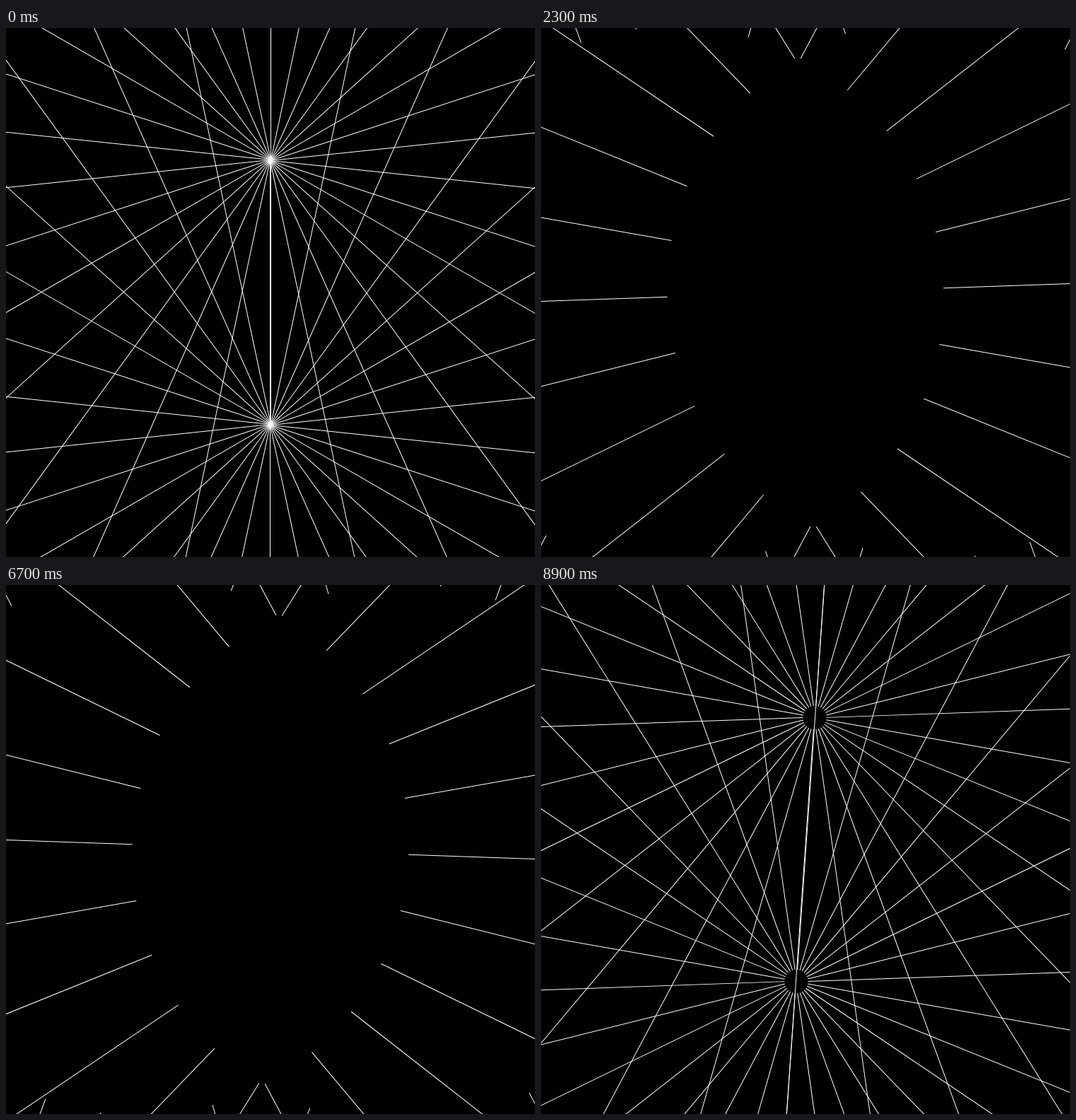
Animation of 748 by 748 pixels, one loop 9000 ms. Source, as an HTML page with a canvas:

```html
<!DOCTYPE html>
<html lang="en">
<head>
<meta charset="utf-8">
<title>Twin starbursts</title>
<style>
  html, body { margin: 0; width: 100%; height: 100%; overflow: hidden; background: #000; }
  canvas { display: block; }
</style>
</head>
<body>
<canvas id="stage" width="748" height="748"></canvas>
<script>
const SIZE = 748;
const LOOP = 9000;
const STEP = 100;
const RAYS = 30;
const ORBIT = SIZE / 4;
const REACH = SIZE * 2;
const TAU = Math.PI * 2;

const ctx = document.getElementById('stage').getContext('2d');

// Rays lie on the clockwise side of their radius, one pixel wide.
function drawBurst(gap) {
  for (let i = 0; i < RAYS; i++) {
    ctx.fillRect(0, -REACH, 1, REACH - gap);
    ctx.rotate(TAU / RAYS);
  }
}

function draw(time) {
  const p = time / LOOP;
  const gap = SIZE * (1 - Math.abs(1 - 2 * p));

  ctx.setTransform(1, 0, 0, 1, 0, 0);
  ctx.fillStyle = '#000';
  ctx.fillRect(0, 0, SIZE, SIZE);
  ctx.fillStyle = '#fff';

  for (const turn of [0, 0.5]) {
    ctx.setTransform(1, 0, 0, 1, SIZE / 2, SIZE / 2);
    ctx.rotate((turn - p) * TAU);
    ctx.translate(0, -ORBIT);
    drawBurst(gap);
  }
}

const start = performance.now();
let shown = -1;

function tick() {
  const time = Math.floor((performance.now() - start) % LOOP / STEP) * STEP;
  if (time !== shown) draw(shown = time);
  requestAnimationFrame(tick);
}
tick();
</script>
</body>
</html>
```
